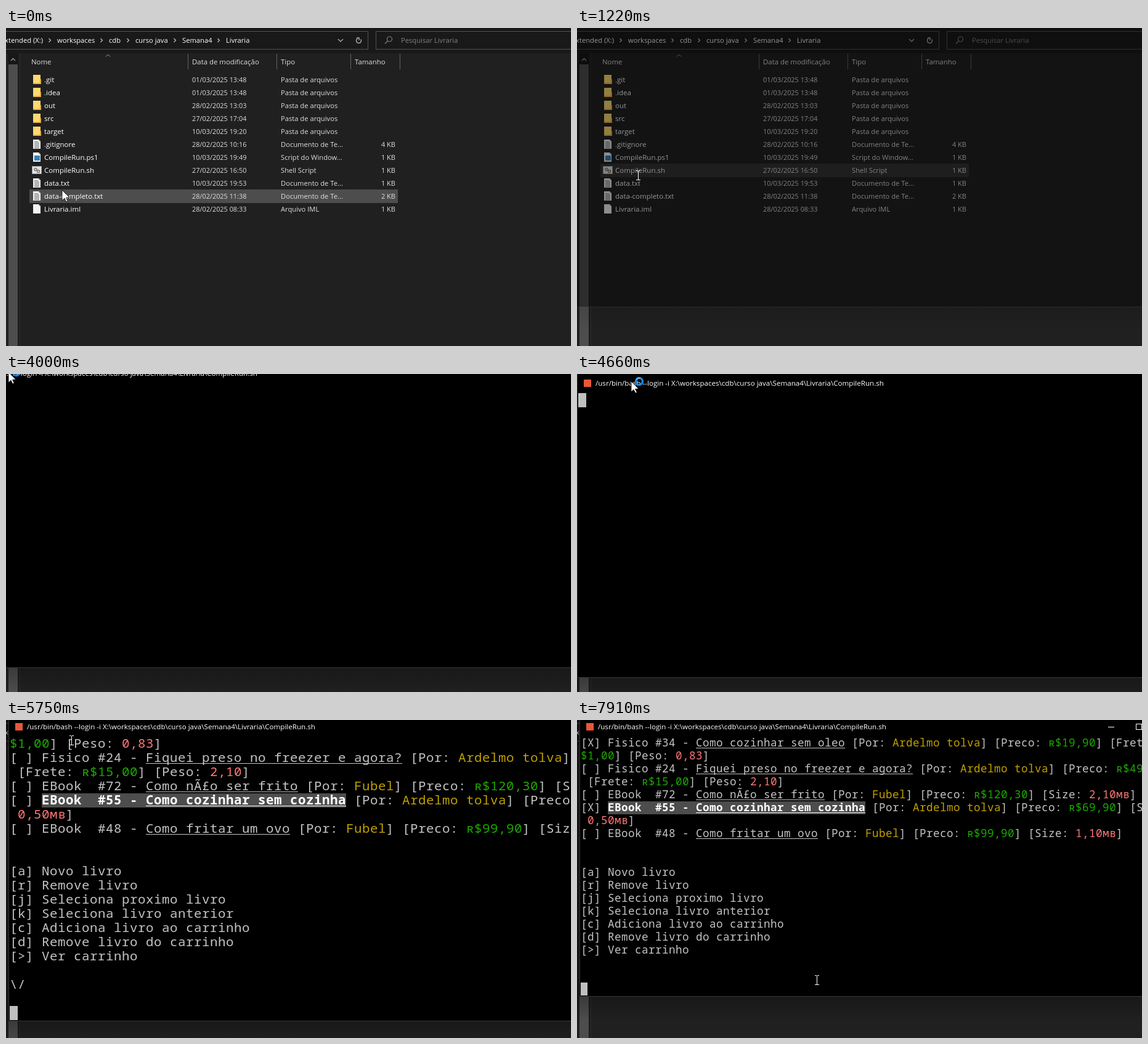
An HTML page with a canvas for the animation above (8 s loop, 917x516 px).

```html
<!DOCTYPE html>
<html lang="pt">
<head>
<meta charset="utf-8">
<style>
html, body { margin: 0; width: 100%; height: 100%; overflow: hidden; background: #202020; }
canvas { display: block; }
</style>
</head>
<body>
<canvas id="stage" width="917" height="516"></canvas>
<script>
const W = 917, H = 516, LOOP = 8000;
const ctx = document.getElementById('stage').getContext('2d');

// Last step whose start time has passed
const stepAt = (t, steps) => steps.filter(s => s[0] <= t).pop().slice(1);

function box(x, y, w, h, color) {
  ctx.fillStyle = color;
  ctx.fillRect(x, y, w, h);
}
function frame(x, y, w, h, color) {
  ctx.strokeStyle = color;
  ctx.lineWidth = 1;
  ctx.strokeRect(x + .5, y + .5, w - 1, h - 1);
}
function line(color, width, ...points) {
  ctx.strokeStyle = color;
  ctx.lineWidth = width;
  ctx.beginPath();
  points.forEach(p => ctx.lineTo(...p));
  ctx.stroke();
}
function ring(x, y, r, color, width, from = 0, to = 7) {
  ctx.strokeStyle = color;
  ctx.lineWidth = width;
  ctx.beginPath();
  ctx.arc(x, y, r, from, to);
  ctx.stroke();
}
function polygon(color, points) {
  ctx.fillStyle = color;
  ctx.beginPath();
  points.forEach(p => ctx.lineTo(...p));
  ctx.fill();
}
function label(text, x, y, color = '#fff', size = 11.4, align = 'left') {
  ctx.font = `${size}px "Open Sans", "Noto Sans", sans-serif`;
  ctx.textAlign = align;
  ctx.fillStyle = color;
  ctx.fillText(text, x, y + 4);
}

// ---- File explorer ----
const FOLDER = 'Pasta de arquivos', TEXT = 'Documento de Te...';
const FILES = [
  ['.git', '01/03/2025 13:48', FOLDER, '', 'folder'],
  ['.idea', '01/03/2025 13:48', FOLDER, '', 'folder'],
  ['out', '28/02/2025 13:03', FOLDER, '', 'folder'],
  ['src', '27/02/2025 17:04', FOLDER, '', 'folder'],
  ['target', '10/03/2025 19:20', FOLDER, '', 'folder'],
  ['.gitignore', '28/02/2025 10:16', TEXT, '4 KB', 'text'],
  ['CompileRun.ps1', '10/03/2025 19:49', 'Script do Window...', '1 KB', 'script'],
  ['CompileRun.sh', '27/02/2025 16:50', 'Shell Script', '1 KB', 'shell'],
  ['data.txt', '10/03/2025 19:53', TEXT, '1 KB', 'text'],
  ['data-completo.txt', '28/02/2025 11:38', TEXT, '2 KB', 'text'],
  ['Livraria.iml', '28/02/2025 08:33', 'Arquivo IML', '1 KB', 'blank'],
];

function icon(kind, y) {
  if (kind === 'folder') {
    box(44, y - 8, 12, 15, '#ffd970');
    box(44, y + 5, 13, 2, '#e8b64a');
    box(55, y - 1, 2, 8, '#e0ac3c');
    return;
  }
  if (kind === 'shell') {
    box(42, y - 7, 16, 13, '#e4e4e4');
    frame(42, y - 7, 16, 13, '#999');
    ring(48, y - 1.5, 2, '#777', 1.5);
    ring(52.5, y + 1.5, 2, '#777', 1.5);
    return;
  }
  polygon('#f3f3f3', [[44, y - 8], [53, y - 8], [56, y - 5], [56, y + 7], [44, y + 7]]);
  polygon('#b5b5b5', [[53, y - 8], [56, y - 5], [53, y - 5]]);
  if (kind === 'text')
    for (let k = -5; k < 6; k += 2) box(46, y + k, k < -3 ? 6 : 8, 1, '#777');
  if (kind === 'script') box(46, y - 3, 9, 8, '#2f83b7');
}

function explorer(active, rowColor) {
  box(0, 0, W, H, '#202020');
  box(0, 0, W, 41, '#191919');
  frame(-5, 5, 593, 30, '#535353');
  frame(600, 5, 330, 30, '#535353');
  label('Extended (X:)', 60, 20, '#fff', 11.2, 'right');
  [['workspaces', 83], ['cdb', 167], ['curso java', 210], ['Semana4', 286], ['Livraria', 357]]
    .forEach(([name, x]) => {
      label(name, x, 20, '#fff', 11.2);
      line('#c0c0c0', 1.2, [x - 13.5, 17], [x - 10.5, 20], [x - 13.5, 23]);
    });
  line('#a0a0a0', 1.5, [539, 18], [543, 22], [547, 18]);
  ring(572.5, 20.5, 4, '#b0b0b0', 1.4, -.6, 4.2);
  line('#b0b0b0', 1.4, [569, 16], [573, 16], [573, 20]);
  ring(622.5, 18, 4, '#808080', 1.2);
  line('#808080', 1.2, [619.5, 21], [615, 25.5]);
  label('Pesquisar Livraria', 641, 20, '#808080', 11.2);

  box(4, 41, 16, H, '#171717');
  box(4, 59, 15, H, '#4d4d4d');
  box(22, 41, 1, H, '#2b2b2b');
  line('#999', 1.3, [8, 53], [11.5, 49.5], [15, 53]);

  line('#a0a0a0', 1, [162, 46.5], [165.5, 43], [169, 46.5]);
  [['Nome', 41], ['Data de modificação', 302], ['Tipo', 446], ['Tamanho', 566]]
    .forEach(([name, x]) => label(name, x, 55, '#dedede'));
  [295, 439, 559, 639].forEach(x => box(x, 42, 1, 25, '#636363'));

  FILES.forEach(([name, date, type, size, kind], i) => {
    const y = 84 + 21 * i;
    if (i === active) box(38, y - 11, 598, 22, rowColor);
    icon(kind, y);
    label(name, 62, y, '#fff', 11.5);
    label(date, 302, y, '#dedede', 10.9);
    label(type, 446, y, '#dedede', 11.2);
    label(size, 632, y, '#dedede', 11, 'right');
  });
}

// ---- Terminal ----
// "~" plus a letter switches the style of the text that follows
const STYLES = {
  0: { color: '#c4c4c4' },
  g: { color: '#1ca800' },
  y: { color: '#c0a000' },
  r: { color: '#ff7676' },
  u: { color: '#c4c4c4', underline: true },
  b: { color: '#fff', bold: true },
  B: { color: '#fff', bold: true, underline: true },
};
const COLS = 87, ROWS = 20, TOP = 27;
const AUTHOR = 'Ardelmo tolva', COOK = 'Fubel';

const book = (mark, id, title, author, price, extra, selected) =>
  `[${mark}] ${selected ? '~b' : ''}${id} - ${selected ? '~B' : '~u'}${title}~0` +
  ` [Por: ~y${author}~0] [Preco: ~gʀ$${price}~0] ${extra}`;
const printed = (freight, weight) => `[Frete: ~gʀ$${freight}~0] [Peso: ~r${weight}~0]`;
const digital = size => `[Size: ~r${size}ᴍʙ~0]`;

const shop = (mark, ending) => [
  book('X', 'Fisico #34', 'Como cozinhar sem oleo', AUTHOR, '19,90', printed('1,00', '0,83')),
  book(' ', 'Fisico #24', 'Fiquei preso no freezer e agora?', AUTHOR, '49,90', printed('15,00', '2,10')),
  book(' ', 'EBook  #72', 'Como nÃ£o ser frito', COOK, '120,30', digital('2,10')),
  book(mark, 'EBook  #55', 'Como cozinhar sem cozinha', AUTHOR, '69,90', digital('0,50'), true),
  book(' ', 'EBook  #48', 'Como fritar um ovo', COOK, '99,90', digital('1,10')),
  '', '',
  '[a] Novo livro', '[r] Remove livro', '[j] Seleciona proximo livro',
  '[k] Seleciona livro anterior', '[c] Adiciona livro ao carrinho',
  '[d] Remove livro do carrinho', '[>] Ver carrinho', ...ending, '',
];
const RULE = '='.repeat(70);
const SCREENS = {
  empty: [''],
  price: [RULE, ' '.repeat(19) + 'Insira o valor do livro [Double]', RULE,
    '', '', '[.] Voltar', '', '', '', ''],
  before: shop(' ', ['', '\\/', '']),
  after: shop('X', ['', '']),
};

function wrap(lines) {
  const rows = [];
  for (const text of lines) {
    let style = STYLES[0], row = [];
    rows.push(row);
    for (let i = 0; i < text.length; i++) {
      if (text[i] === '~') { style = STYLES[text[++i]]; continue; }
      if (row.length === COLS) rows.push(row = []);
      row.push({ char: text[i], style });
    }
  }
  return rows.slice(-ROWS);
}
for (const name in SCREENS) SCREENS[name] = wrap(SCREENS[name]);

function screenText(rows, cell, caret) {
  const height = cell + 10, size = cell * 1.6;
  ctx.textAlign = 'left';
  rows.forEach((row, r) => {
    const y = TOP + r * height;
    row.forEach(({ char, style }, c) => {
      const x = 6 + c * cell;
      if (style.bold) box(x, y, cell, height, '#4d4d4d');
      ctx.font = `${style.bold ? 700 : 500} ${size}px "Noto Sans Mono", "DejaVu Sans Mono", monospace`;
      ctx.fillStyle = style.color;
      if (char !== ' ') ctx.fillText(char, x, y + Math.round(height * .78));
      if (style.underline) box(x, y + height - 3, cell, 1, style.color);
    });
  });
  if (caret) box(6, TOP + (rows.length - 1) * height, cell, height, '#bfbfbf');
}

function terminal(t) {
  const [dx, dy, alpha] = stepAt(t, [
    [1220, -110, -36, .42], [1370, -110, -31, .85], [1500, -110, -27, 1],
    [4000, -94, -12, 1], [4120, -66, -6, 1], [4240, -42, -2, 1], [4360, -22, 1, 1],
    [4510, -8, 4, 1], [4660, -4, 4, 1], [4780, -2, 2, 1], [4900, -1, 1, 1], [5020, 0, 0, 1],
  ]);
  const [screen] = stepAt(t, [[0, 'empty'], [5330, 'price'], [5480, 'before'], [5870, 'after']]);
  const [cell] = stepAt(t, [[0, 13], [7660, 12], [7910, 11]]);
  const [caret] = stepAt(t, [[0, true], [5480, false], [5600, true], [6570, false],
    [6960, true], [7390, false], [7660, true]]);
  const bottom = TOP + ROWS * (cell + 10) + 1;

  ctx.save();
  ctx.translate(dx, dy);
  ctx.globalAlpha = alpha;
  const shadow = ctx.createLinearGradient(0, bottom, 0, bottom + 40);
  shadow.addColorStop(0, 'rgba(0,0,0,.25)');
  shadow.addColorStop(1, 'rgba(0,0,0,0)');
  box(0, bottom, 1100, 40, shadow);
  box(-8, -10, 12, bottom + 10, 'rgba(0,0,0,.3)');
  box(4, -10, 1, bottom + 10, '#333');
  box(4, bottom, 1100, 1, '#383838');
  box(5, -10, 1100, bottom + 10, '#000');
  box(15, 5, 12, 12, '#e8573a');
  label('/usr/bin/bash --login -i X:\\workspaces\\cdb\\curso java\\Semana4\\Livraria\\CompileRun.sh',
    34, 11, '#fff', 11.6);
  if (cell === 11) {
    box(862, 11, 10, 1, '#fff');
    frame(907, 6, 10, 10, '#fff');
  }
  screenText(SCREENS[screen], cell, caret);
  ctx.restore();
}

// ---- Mouse pointer ----
const ARROW = [[0, 0], [0, 17], [4, 13.2], [6.7, 19], [9.2, 18], [6.6, 12.3], [12, 12]];

function pointer(t) {
  const [kind, x, y] = stepAt(t, [
    [0, 'arrow', 91, 263], [150, 'arrow', 92, 258], [270, 'arrow', 95, 250],
    [390, 'arrow', 97, 243], [510, 'arrow', 98, 237], [940, 'busy', 98, 237],
    [1220, 'beam', 99, 239], [2080, 'beam', 85, 215], [2200, 'beam', 66, 190], [2320, 'beam', 52, 177],
    [4000, 'busy', 4, -3], [4120, 'busy', 30, 2], [4240, 'busy', 52, 6], [4360, 'busy', 72, 9],
    [4510, 'busy', 85, 12], [4660, 'busy', 88, 12], [4780, 'busy', 90, 10], [4900, 'busy', 91, 9],
    [5020, 'busy', 92, 8],
    [5750, 'beam', 106, 33], [5870, 'beam', 420, 42], [5990, 'beam', 720, 49],
    [6450, 'beam', 640, 180], [6570, 'beam', 560, 300], [6690, 'beam', 479, 424],
    [6960, 'beam', 434, 423], [7080, 'beam', 389, 422],
  ]);
  ctx.save();
  ctx.translate(x, y);
  if (kind === 'beam') {
    box(0, -7, 1, 15, '#fff');
    for (const edge of [-8, 7]) {
      box(-3, edge, 3, 1, '#fff');
      box(1, edge, 3, 1, '#fff');
    }
  } else {
    polygon('#fff', ARROW);
    line('#000', .8, ...ARROW, ARROW[0]);
    if (kind === 'busy') {
      ring(13, 0, 5.5, '#1a86e0', 3.4);
      ring(13, 0, 5.5, '#58b4ff', 2, 3.6, 5);
    }
  }
  ctx.restore();
}

function draw() {
  const t = performance.now() % LOOP;
  const [row, color] = stepAt(t, [[0, 9, '#4d4d4d'], [150, 8, '#4d4d4d'],
    [390, 7, '#4d4d4d'], [660, 7, '#777'], [1220, 7, '#333']]);
  explorer(row, color);
  if (t >= 1220) terminal(t);
  pointer(t);
  requestAnimationFrame(draw);
}
draw();
</script>
</body>
</html>
```
